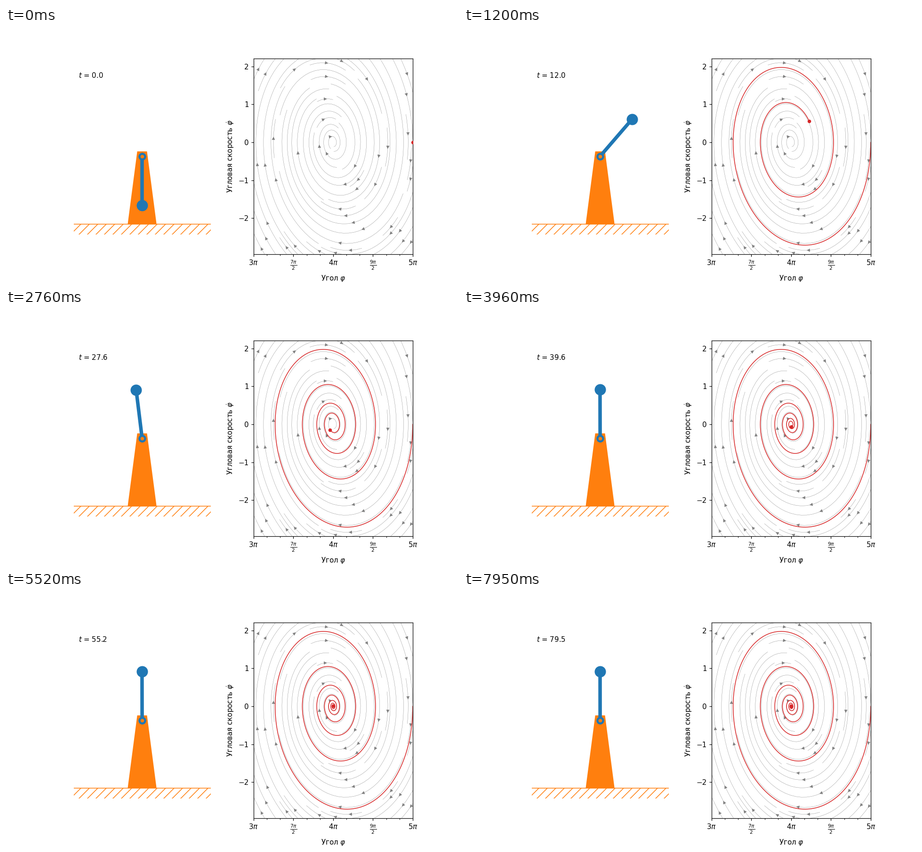
These frames come from a looping animation (960 by 540 pixels, 7.98 s). A matplotlib script:

```python
import numpy as np
import matplotlib.pyplot as plt
from matplotlib.animation import FuncAnimation
from matplotlib.collections import PathCollection
from matplotlib.patches import Polygon, Rectangle
from matplotlib.ticker import AutoMinorLocator

FRAMES, DT, SUB = 266, 0.3, 20
TARGET = 4 * np.pi
DAMP = 0.1
OMEGA = np.sqrt(1 - DAMP**2)


def solve(t):
    """Damped swing x'' = -x - 2*DAMP*x', released at rest from x = pi."""
    amp = np.pi * np.exp(-DAMP * t)
    s, c = np.sin(OMEGA * t), np.cos(OMEGA * t)
    return TARGET + amp * (c + DAMP / OMEGA * s), -amp / OMEGA * s


time = np.arange((FRAMES - 1) * SUB + 1) * DT / SUB
phi, vel = solve(time)

plt.rcParams.update({"font.family": "DejaVu Sans", "font.size": 10})
fig, (scene, phase) = plt.subplots(1, 2, figsize=(80 / 9, 5), dpi=108)

# Pendulum on its stand
scene.set_aspect("equal", adjustable="datalim")
half = 2 * (0.775 / 2.2 * 960) / (0.77 * 540)
scene.set(xlim=(-half, half), ylim=(-2, 2))
scene.axis("off")

GROUND = -1.39
scene.add_patch(Rectangle((-1.4, -1.6), 2.8, GROUND + 1.6, fill=False,
                          hatch="//", edgecolor="C1", linewidth=0))
scene.plot([-1.4, 1.4], [GROUND, GROUND], color="C1", lw=1,
           solid_capstyle="butt")
scene.add_patch(Polygon([(-0.1, 0.1), (0.1, 0.1), (0.295, GROUND),
                         (-0.295, GROUND)], facecolor="C1", lw=0))
rod, = scene.plot([], [], color="C0", lw=5)
bob, = scene.plot([], [], "o", color="C0", ms=15)
scene.plot(0, 0, "o", color="C0", ms=10)
scene.plot(0, 0, "o", color="C1", ms=4)
clock = scene.text(0.1, 0.9, "", transform=scene.transAxes)

# Phase portrait
xlim = (3 * np.pi, 5 * np.pi)
pad = 0.05 * np.ptp(vel)
ylim = (vel.min() - pad, vel.max() + pad)
X, V = np.meshgrid(np.linspace(*xlim, 100), np.linspace(*ylim, 100))
phase.streamplot(X, V, V, TARGET - X - 2 * DAMP * V,
                 color="gray", linewidth=0.3)
phase.set(xlim=xlim, ylim=ylim, xlabel=r"Угол $\varphi$",
          ylabel=r"Угловая скорость $\dot{\varphi}$")
phase.set_xticks(np.arange(6, 11) * np.pi / 2,
                 [r"$3\pi$", r"$\frac{7\pi}{2}$", r"$4\pi$",
                  r"$\frac{9\pi}{2}$", r"$5\pi$"])
phase.set_yticks(range(-2, 3))
phase.xaxis.set_minor_locator(AutoMinorLocator(3))

# One collection for all arrowheads draws much faster than single patches
fig.canvas.draw()
arrows = list(phase.patches)
heads = [a.get_path() for a in arrows]
for a in arrows:
    a.remove()
phase.add_collection(PathCollection(heads, facecolor="gray", edgecolor="gray",
                                    linewidth=0.3, zorder=2,
                                    transform=phase.transData),
                     autolim=False)

trail, = phase.plot([], [], color="C3", lw=1, zorder=2.2)
dot, = phase.plot([], [], "o", color="C3", ms=4, zorder=3)


def update(i):
    k = i * SUB
    x, y = np.sin(phi[k]), np.cos(phi[k])
    rod.set_data([0, x], [0, y])
    bob.set_data([x], [y])
    trail.set_data(phi[:k + 1], vel[:k + 1])
    dot.set_data([phi[k]], [vel[k]])
    clock.set_text(f"$t$ = {i * DT:.1f}")
    return rod, bob, trail, dot, clock


anim = FuncAnimation(fig, update, frames=FRAMES, interval=30,
                     repeat=True, repeat_delay=0)
plt.show()
```
